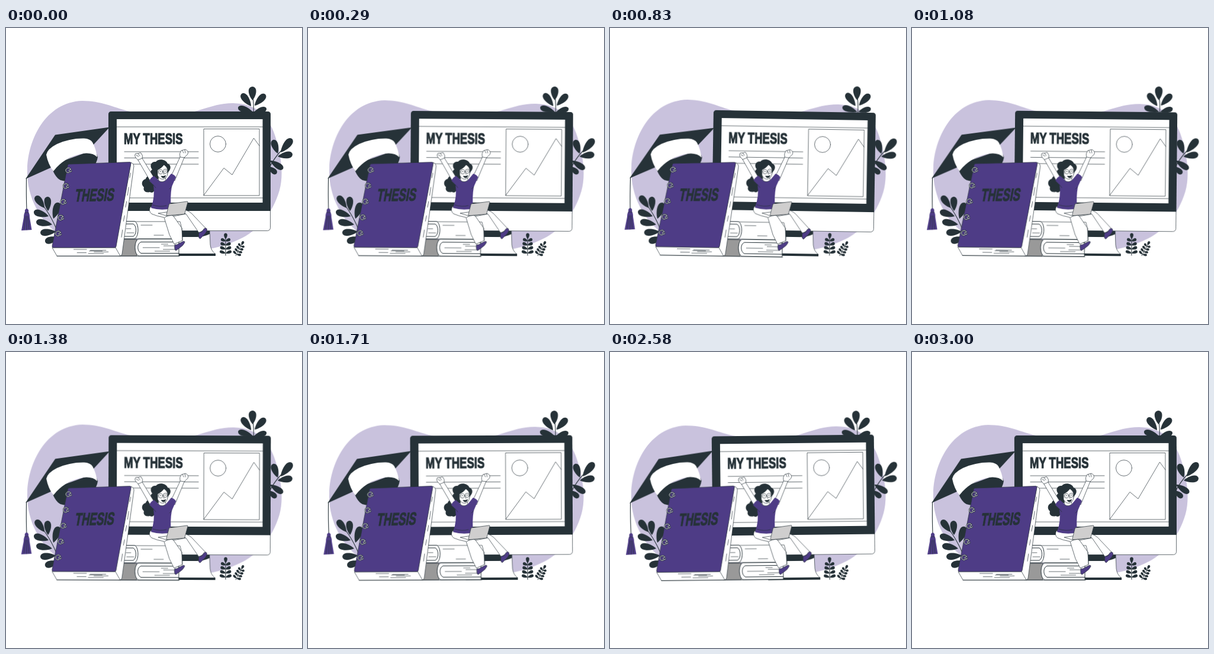
Animation, 500 px wide and 500 px high, one loop 3.04 s. Source, as an HTML page:

```html
<!DOCTYPE html>
<html lang="en">
<head>
<meta charset="utf-8">
<title>My thesis</title>
<style>
  html, body { margin: 0; width: 100%; height: 100%; overflow: hidden; background: #fff; }
  svg { display: block; width: 100vw; height: 100vh; }
  .sway { animation: sway 3040ms linear infinite; }
  #blob { transform-origin: 250px 249px; fill: #c9c2dd; }
  #topPlants { transform-origin: 439px 173px; }
  #leftPlant { transform-origin: 74px 324px; }
  #lowPlants { transform-origin: 382px 366px; }
  #monitor { transform-origin: 310px 263px; }
  #cap { transform-origin: 104px 255px; }
  #books { transform-origin: 185px 305px; }
  #girl { transform-origin: 279px 291px; }
  .ink { fill: #263238; }
  .violet { fill: #4e3c86; }
  .paper { fill: #fff; stroke: #263238; stroke-width: .7; stroke-linejoin: round; }
  .line { fill: none; stroke: #263238; stroke-width: .7; stroke-linecap: round; stroke-linejoin: round; }
  .stem { fill: none; stroke: #263238; stroke-width: 1.1; }
  .bold { stroke-width: 1; }
  text { font-family: "Liberation Sans", Arial, sans-serif; font-weight: 700; fill: #263238; stroke: #263238; stroke-width: 1.2; }
  @keyframes sway {
    25% { transform: rotate(1deg); }
    75% { transform: rotate(-1deg); }
  }
</style>
</head>
<body>
<svg viewBox="0 0 500 500">
  <g id="blob" class="sway">
    <path d="M36 238C37 190 66 125 129 123C160 123 182 134 205 140C225 145 240 148 260 148C320 150 342 126.500 384 127C425 128 446 150 457 190C465 218 469 248 462 274C450 315 425 341 400 354C375 367 350 373 320 377C240 388 145 380 95 353C56 328 34 282 36 238Z"/>
  </g>

  <g id="topPlants" class="sway ink">
    <path class="stem" d="M418 146Q419 126 416 110M443 240Q452 220 466 206"/>
  </g>
  <g id="leftPlant" class="sway ink">
    <path class="stem" d="M94 366Q84 328 62 299"/>
  </g>
  <g id="lowPlants" class="sway ink"></g>

  <g id="monitor" class="sway">
    <path class="paper" d="M270 341H344L345 366Q346 376 354 382H268Z"/>
    <path class="ink" d="M282 341H344L344 348Q334 353 322 353H282Z"/>
    <path class="ink" d="M266 381H354V385H266Z"/>
    <rect class="paper" x="173.5" y="141.5" width="273" height="201" rx="5"/>
    <path class="ink" d="M173 309V146Q173 141 178 141H442Q447 141 447 146V309Z"/>
    <rect x="187" y="154" width="246.500" height="141" fill="#fff"/>
    <path class="line" d="M187 167H433.500M187 287H433.500M200 209H325M200 219.500H325M200 230H325"/>
    <rect class="paper" x="334" y="170.500" width="94" height="112.500"/>
    <circle class="line" cx="358" cy="196" r="13.500"/>
    <path class="line" d="M334 282.500L368 236.500L382 248L418.500 186L428 199"/>
    <text transform="translate(199 195.500) scale(.7 1)" font-size="26.500">MY THESIS</text>
  </g>

  <g id="cap" class="sway">
    <path class="ink" d="M33 255L83 180.500L175 167.500L146 199L80 234Z"/>
    <path class="ink" d="M76 232Q82 252 92 257Q104 261 120 255Q152 240 155 218L150 205Z"/>
    <path d="M68 214Q70 204 86 196Q108 186 132 186.500Q142 187 146 193Q152 204 154 218Q146 210 130 212Q98 218 80 242Q71 230 68 214Z" fill="#fff"/>
    <path class="stem" d="M34.500 253Q34 282 35 308"/>
    <path class="violet" d="M35 305Q39 306 38 311Q40 314 40 320L43.500 341L26 342L30 320Q30 314 32 311Q31 306 35 305Z"/>
    <path class="line" d="M32 312H38M33 318L30.500 340M35 318V341M37 318L39 340" stroke-width=".5"/>
  </g>

  <g id="books" class="sway">
    <path class="paper" d="M196 327H294Q299 341 294 356H196Z"/>
    <path class="paper bold" d="M198 326.500H217C225 329 225 353 217 356H198"/>
    <path class="line bold" d="M198 331H215C221 334 221 349 215 352H198"/>
    <path class="line" d="M203 339H211M204 346H216M228 333H247M250 350H266"/>
    <path d="M190 357H221V385H190Z" fill="#999" stroke="#263238" stroke-width=".7"/>
    <path class="paper bold" d="M292 356.500H224C216 359 216 382 224 385H292Z"/>
    <path class="line bold" d="M292 361.500H228C221 364 221 377 228 380.500H292"/>
    <path class="line" id="stackPages" d="M86 385.500H293"/>
    <path class="paper" d="M78 371L86 385H193Q195 385 196 382L216 233Q216 229 211 227L185 371Z"/>
    <path class="line" d="M185 371L193 385"/>
    <path class="line" id="pages"/>
    <path class="violet" d="M106 230L209 226.500Q211.500 226.500 211 229L186 369Q185.500 371 183 371H80Q77.500 371 78 368L104 233Q104.400 230 106 230Z" stroke="#263238" stroke-width=".7"/>
    <g id="rings"></g>
    <text transform="translate(115.500 293) rotate(-1.200) skewX(-11) scale(.62 1)" font-size="29.500">THESIS</text>
  </g>

  <g id="girl" class="sway">
    <path class="ink" d="M247 239C241 231 247 225 253 226C257 220 270 221 273 229C279 231 279 238 275 242L271 250L254 256C256 263 254 268 250 268C253 275 248 280 243 277C236 279 231 275 233 269C227 264 230 256 236 255C237 250 244 248 247 251C243 247 243 241 247 239Z"/>
    <path class="paper" d="M249 251L230 220Q232 216 228 211Q226 210 224 212L219 212Q216 216 220 220L223 223L245 261Z"/>
    <path class="line" d="M220 215L224 217M223 212L226 216M223 223L230 220"/>
    <path class="paper" d="M278 252L294 218Q292 212 296 207L303 205Q309 208 307 213L301 219L285 258Z"/>
    <path class="line" d="M298 207L300 211M302 206L303 211M294 218L301 219"/>
    <path class="paper" d="M244 302Q240 309 246 314Q255 318 267 320L276 349L284 365L298 359L297 338L283 318L304 314L326 346L338 339L318 318Q311 309 301 307L277 303Z"/>
    <path class="line" d="M283 318Q276 313 266 313M268 320L274 317M297 338Q299 348 298 359"/>
    <path class="violet" d="M242 258Q245 252 250 250L258 257Q264 262 270 257L279 246Q285 248 287 252L280 268Q277 285 279 305Q262 309 245 304Q252 285 249 265Z"/>
    <path class="line" d="M249 265L253 270M280 268L276 272M248 299Q260 303 271 300"/>
    <path class="paper" d="M257 251L258 258Q264 262 270 257L269 251Z"/>
    <path class="paper" d="M256 236Q262 232 267 231Q272 234 273 240Q274 252 267 255Q260 257 256 249Z"/>
    <path class="ink" d="M254 241Q262 238 267 231Q271 235 275 237Q273 226 263 226Q253 228 254 241Z"/>
    <circle class="line" cx="261" cy="243" r="3.700"/>
    <circle class="line" cx="269" cy="242" r="3.500"/>
    <path class="line" d="M264.700 242.500L265.500 242.300M259.500 243Q261 241.500 262.500 243M267.500 242Q269 240.500 270.500 242M266 245L267 247.500"/>
    <path class="ink" d="M261.500 249.500Q266 251 270 248.500Q269.500 253.500 266 253.500Q263 253.500 261.500 249.500Z"/>
    <path class="violet" d="M285 366Q289 367 292 364L298 361Q302 359 302 362Q300 367 294 371L287 376Q284 375 285 366Z" stroke="#263238" stroke-width=".7"/>
    <path class="violet" d="M326 345Q331 346 333 341Q336 336 339 339Q341 342 336 348L328 356Q324 355 326 345Z" stroke="#263238" stroke-width=".7"/>
    <path class="paper" d="M257 313L271 311L303 313.500L272 317.500Z"/>
    <path d="M275.500 297L306 293Q307.500 293 307 294.500L302 313Q301.500 314.500 300 314.500L272 317Q270.500 317 271 315Z" fill="#cfcece" stroke="#263238" stroke-width=".7"/>
  </g>
</svg>
<script>
  const NS = 'http://www.w3.org/2000/svg';
  const $ = id => document.getElementById(id);

  function add(parent, d, cls) {
    const p = document.createElementNS(NS, 'path');
    p.setAttribute('d', d);
    if (cls) p.setAttribute('class', cls);
    parent.append(p);
    return p;
  }

  // A teardrop leaf from its base to its tip, widest past the middle.
  function leaf(parent, x, y, tx, ty, w) {
    const len = Math.hypot(tx - x, ty - y);
    const turn = Math.atan2(ty - y, tx - x) * 180 / Math.PI;
    add(parent, `M0 0C${len * .25} ${-w * .5} ${len * .95} ${-w} ${len} 0C${len * .95} ${w} ${len * .25} ${w * .5} 0 0Z`)
      .setAttribute('transform', `translate(${x} ${y}) rotate(${turn})`);
  }

  function frond(parent, place) {
    const g = document.createElementNS(NS, 'g');
    g.setAttribute('transform', place);
    parent.append(g);
    add(g, 'M0 0V-30', 'stem');
    leaf(g, 0, -28, 0, -38, 5);
    for (let i = 0; i < 4; i++) {
      const y = -4 - i * 6.8, reach = 10 - i * .7;
      for (const side of [-1, 1]) leaf(g, 0, y, side * reach, y - 3.5, 4.5);
    }
  }

  [[416.500, 122, 416, 99, 11], [414, 132, 398, 111, 10], [420, 131, 438, 112, 10],
   [417, 142, 392, 134, 9], [419, 142, 440, 136, 8],
   [459, 212, 451, 189, 10], [464, 210, 483, 187, 11], [459, 217, 484, 213, 10],
   [446, 224, 468, 238, 9], [443, 234, 457, 246, 8]]
    .forEach(l => leaf($('topPlants'), ...l));

  [[65, 304, 50, 284, 10], [71, 309, 70, 285, 10], [80, 322, 89, 295, 11],
   [72, 318, 47, 310, 10], [78, 332, 51, 327, 10], [84, 344, 58, 346, 10],
   [89, 354, 66, 361, 10]]
    .forEach(l => leaf($('leftPlant'), ...l));

  frond($('lowPlants'), 'translate(371 384.500)');
  frond($('lowPlants'), 'translate(388 385) rotate(28) scale(.74)');

  // Loose strokes along the page edges.
  let seed = 7;
  const rnd = () => (seed = seed * 16807 % 2147483647) / 2147483647;
  function strokes(n, x0, x1, y0, y1) {
    let d = '';
    for (let i = 0; i < n; i++) {
      const len = 10 + rnd() * 22;
      const x = x0 + rnd() * (x1 - x0 - len), y = y0 + (y1 - y0) * i / (n - 1);
      d += `M${x} ${y}h${len}`;
    }
    return d;
  }
  let side = '';
  for (let i = 0; i < 5; i++) {
    const y = 245 + i * 24, x = 212.500 - (y - 232) * .144;
    side += `M${x} ${y}l-1.800 ${8 + rnd() * 6}`;
  }
  $('pages').setAttribute('d', strokes(6, 90, 186, 374, 381) + side);
  $('stackPages').setAttribute('d', 'M86 385.5H293' + strokes(5, 227, 290, 365, 377));

  for (let i = 0; i < 5; i++) {
    const x = 107 - i * 4.300, y = 240.500 + i * 26.700;
    const coil = `M${x + 3.500} ${y + 1}a2 2 0 1 1 -1 -2.300c-1 -4.500 -8 -3.500 -8.500 1c0 3.500 3.500 5.500 6 3.500`;
    add($('rings'), coil, 'line').style.strokeWidth = 2.2;
    const core = add($('rings'), coil, 'line');
    core.style.stroke = '#d8d8dc';
    core.style.strokeWidth = 1;
  }
</script>
</body>
</html>
```
